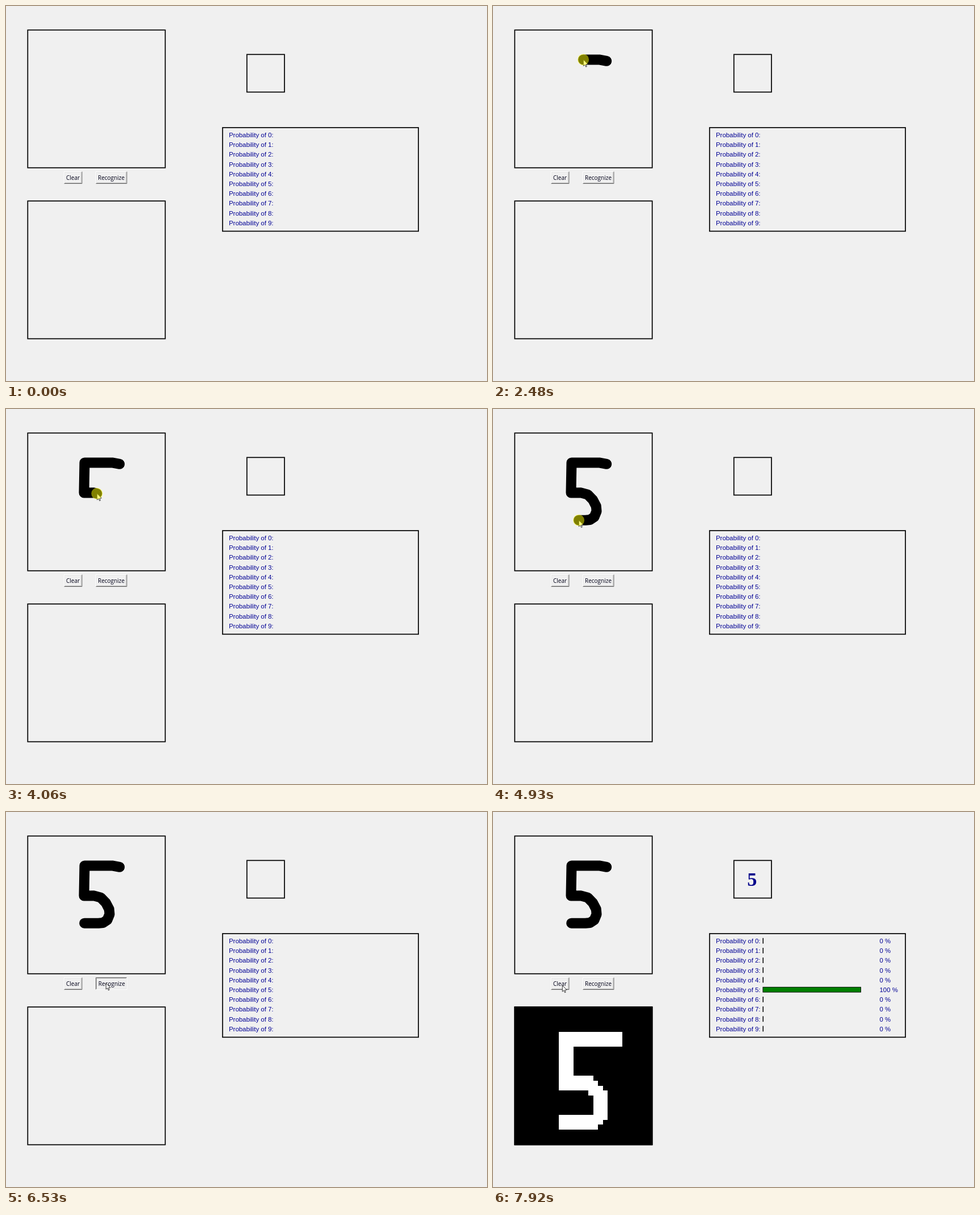
An HTML page with a canvas for the animation above (8000 ms loop, 848 by 660 pixels).

```html
<!DOCTYPE html>
<html lang="en">
<head>
<meta charset="utf-8">
<title>Digit recognizer</title>
<style>
html, body { margin: 0; width: 100%; height: 100%; overflow: hidden; background: #f0f0f0; }
canvas { display: block; }
</style>
</head>
<body>
<canvas id="stage" width="848" height="660"></canvas>
<script>
const ctx = document.getElementById('stage').getContext('2d');
const LOOP = 8000, CURSOR_IN = 300, PEN_DOWN = 1860, PEN_UP = 5540;
const CLICK = 6430, RELEASE = 6530, DONE = 6590;
const SCALE = 0.86, STEP = 77, PEN = 9;
const SANS = '11.4px "Liberation Sans", Arial, sans-serif';

const clamp = v => Math.max(0, Math.min(1, v));
const linear = u => u;
const easeIn = u => u ** 1.5;
const easeOut = power => u => 1 - (1 - u) ** power;

// Each move continues from where the last one ended.
const moves = [];
let last = [716, 569];
function move(from, to, points, ease = linear, ink = false) {
  moves.push({ from, to, path: [last, ...points], ease, ink });
  last = points[points.length - 1];
}
const write = (from, to, points, ease) => move(from, to, points, ease, true);

move(CURSOR_IN, 360, [[400, 381]]);
move(700, 1150, [[233, 151]]);
move(1400, 1700, [[200.3, 96.8]]);
write(2180, 2570, [[187, 94.4], [138.5, 94.4]]);
write(2950, 3430, [[137.5, 147.5]], easeOut(1.45));
write(3740, 4540, [[155, 147.3], [167, 150.7], [176, 159.8], [181.8, 171], [182.6, 180], [178.5, 190]], easeIn);
write(4660, 5310, [[171, 195], [163, 195.7], [138.2, 195.7]], easeOut(2));
move(5720, CLICK, [[176, 301]]);
move(7370, 7520, [[139, 312]]);
move(7670, 7920, [[122, 305]]);

// The pointer is sampled at a steady rate, so it advances in steps.
function progress({ from, to, ease }, t) {
  const gaps = Math.round((to - from) / STEP);
  const gap = Math.floor(gaps * clamp((t - from) / (to - from)));
  return ease((gap + 1) / (gaps + 1));
}

// The first part of a polyline, cut at a fraction of its length.
function cut(path, fraction) {
  const lengths = path.slice(1).map(([x, y], i) => Math.hypot(x - path[i][0], y - path[i][1]));
  let left = fraction * lengths.reduce((a, b) => a + b);
  const out = [path[0]];
  for (let i = 0; i < lengths.length && left > 0; i++) {
    const [ax, ay] = path[i], [bx, by] = path[i + 1];
    const k = Math.min(1, left / lengths[i]);
    out.push([ax + (bx - ax) * k, ay + (by - ay) * k]);
    left -= lengths[i];
  }
  return out;
}

function distance(x, y, path) {
  return Math.min(...path.slice(1).map(([bx, by], i) => {
    const [ax, ay] = path[i], dx = bx - ax, dy = by - ay;
    const k = clamp(((x - ax) * dx + (y - ay) * dy) / (dx * dx + dy * dy || 1));
    return Math.hypot(x - ax - dx * k, y - ay - dy * k);
  }));
}

function trace(points) {
  ctx.beginPath();
  points.forEach(([x, y]) => ctx.lineTo(x, y));
}

function text(label, x, y, font, color) {
  ctx.font = font;
  ctx.fillStyle = color;
  ctx.fillText(label, x, y);
}

function box(x, y, w, h = w) {
  ctx.strokeStyle = '#000';
  ctx.lineWidth = 2 * SCALE;
  ctx.strokeRect(x, y, w, h);
}

function button(label, x, w, pressed) {
  const top = 291, bottom = 313, right = x + w;
  const corner = (color, cx, cy, inset) => {
    ctx.strokeStyle = color;
    ctx.lineWidth = 1;
    trace([[x + inset, cy], [cx, cy], [cx, top + inset]]);
    if (cx < right - 2) trace([[cx, bottom - inset], [cx, cy], [right - inset, cy]]);
    ctx.stroke();
  };
  const light = ['#fff', '#e6e6e6'], dark = ['#6c6c6c', '#a6a6a6'];
  [0, 1].forEach(i => {
    const inset = i + 0.5;
    corner((pressed ? dark : light)[i], x + inset, top + inset, inset);
    corner((pressed ? light : dark)[i], right - inset, bottom - inset, inset);
  });
  const shift = pressed ? SCALE : 0;
  text(label, x + 4 + shift, 305.5 + shift, '10px "Open Sans", sans-serif', '#000018');
}

function probabilities(done) {
  for (let digit = 0; digit < 10; digit++) {
    const y = 231 + digit * 20 * SCALE, share = digit === 5 ? 100 : 0;
    text(`Probability of ${digit}:`, 393, y, SANS, '#000094');
    if (!done) continue;
    text(`${share} %`, 681.5, y, SANS, '#000094');
    const length = 2 * share * SCALE;
    ctx.fillStyle = '#000';
    ctx.fillRect(475.4, y - 9.2, length + 1.5, 9.8);
    ctx.fillStyle = '#008000';
    if (share) ctx.fillRect(476.3, y - 8.3, length - 0.3, 8);
  }
}

// The drawing, fitted to 20 rows of a 28 x 28 grid.
function pixelDigit() {
  const path = moves.filter(m => m.ink).flatMap(m => m.path);
  const cell = 10 * SCALE, sample = 5.98;
  ctx.fillStyle = '#000';
  ctx.fillRect(37.4, 342.4, 244, 244);
  for (let row = 0; row < 28; row++) {
    for (let col = 0; col < 28; col++) {
      const gap = distance(129.5 + (col - 8.5) * sample, 85.5 + (row - 4.5) * sample, path);
      const shade = 255 * clamp((PEN + 0.7 - gap) / 0.5);
      if (!shade) continue;
      const x = Math.round(39 + col * cell), y = Math.round(344 + row * cell);
      ctx.fillStyle = `rgb(${shade},${shade},${shade})`;
      ctx.fillRect(x, y, Math.round(39 + (col + 1) * cell) - x, Math.round(344 + (row + 1) * cell) - y);
    }
  }
}

function arrow([x, y]) {
  ctx.save();
  ctx.translate(x + 0.3, y + 0.3);
  trace([[0, 0], [0, 10.8], [2.5, 8.5], [4.2, 12.5], [5.9, 11.8], [4.3, 8], [7.8, 7.8]]);
  ctx.closePath();
  ctx.fillStyle = '#fff';
  ctx.fill();
  ctx.lineWidth = 0.9;
  ctx.strokeStyle = '#222';
  ctx.stroke();
  ctx.restore();
}

function highlight([x, y]) {
  ctx.fillStyle = 'rgba(255,255,0,0.5)';
  ctx.beginPath();
  ctx.arc(x, y, 10, 0, Math.PI * 2);
  ctx.fill();
}

function stroke(points) {
  ctx.save();
  ctx.lineCap = ctx.lineJoin = 'round';
  ctx.lineWidth = 2 * PEN;
  ctx.strokeStyle = '#000';
  trace(points);
  ctx.stroke();
  ctx.restore();
}

function draw(t) {
  const done = t >= DONE;
  ctx.fillStyle = '#f0f0f0';
  ctx.fillRect(0, 0, 848, 660);
  box(38.3, 42.3, 242.4);
  box(38.3, 343.2, 242.4);
  box(424.7, 85.3, 66.2);
  box(381.8, 214.1, 345.3, 182.3);
  button('Clear', 102, 32.5, false);
  button('Recognize', 158, 55.5, t >= CLICK && !done);
  probabilities(done);
  if (done) {
    pixelDigit();
    text('5', 448.3, 129.5, 'bold 34px "Liberation Serif", Times, serif', '#00008b');
  }

  if (t < CURSOR_IN) return;
  const parts = moves.filter(m => t >= m.from).map(m => ({ ink: m.ink, path: cut(m.path, progress(m, t)) }));
  const ink = parts.filter(p => p.ink).flatMap(p => p.path);
  if (ink.length) stroke(ink);
  const tip = parts.pop().path.pop();
  arrow(tip);
  if (t >= PEN_DOWN && t < PEN_UP || t >= CLICK && t < RELEASE) highlight(tip);
}

const start = performance.now();
function frame() {
  draw((performance.now() - start) % LOOP);
  requestAnimationFrame(frame);
}
frame();
</script>
</body>
</html>
```
